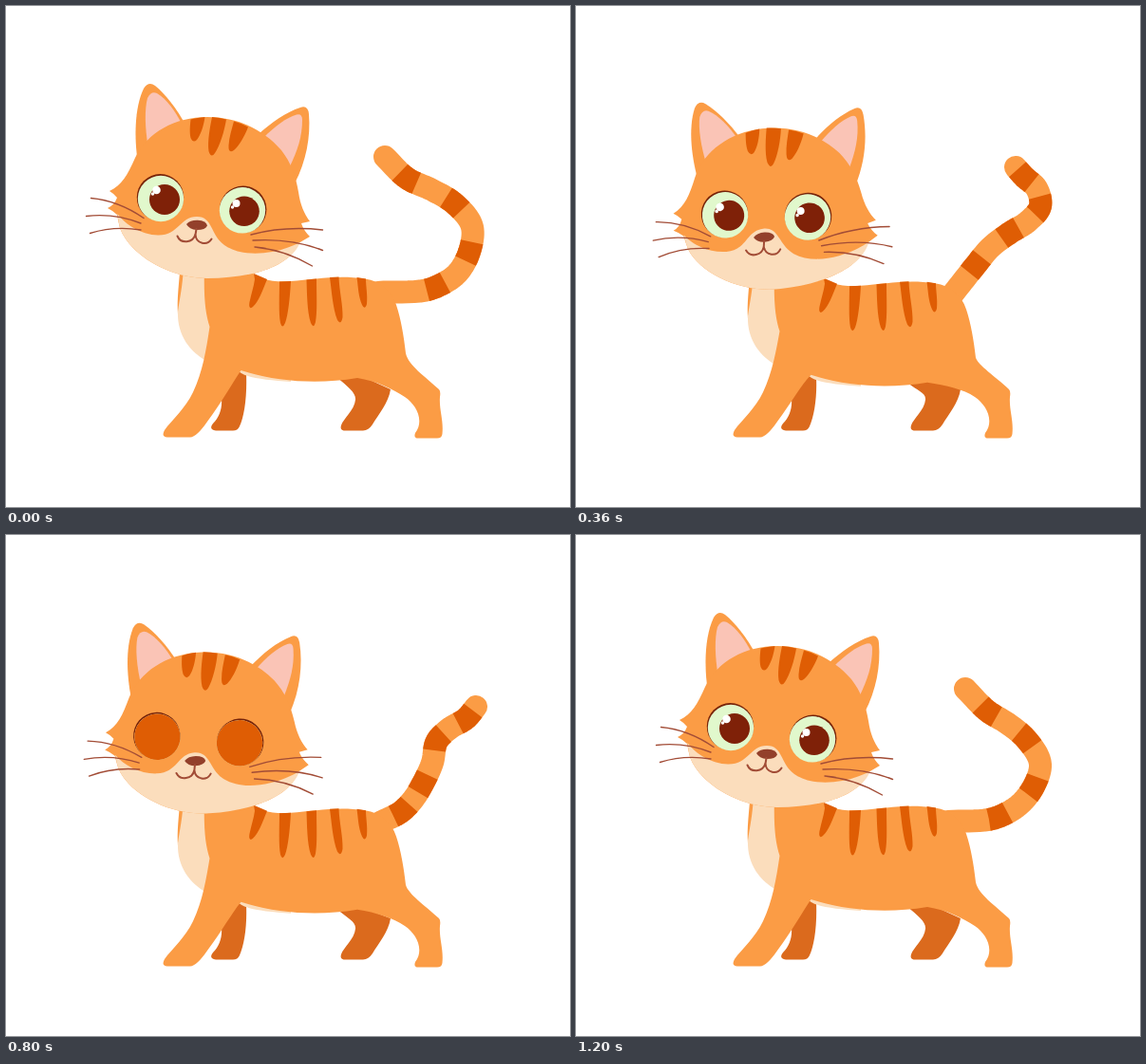
Animation, 594 px wide and 528 px high, one loop 1.24 s. Source, as an HTML page:

```html
<!DOCTYPE html>
<html lang="en">
<head>
<meta charset="utf-8">
<title>Cat</title>
<style>
  html, body { margin: 0; width: 100%; height: 100%; overflow: hidden; background: #fff; }
  svg { display: block; width: 594px; height: 528px; }
  .fur { fill: #fb9c45; }
  .dark { fill: #df5d04; }
  .far { fill: #db6a1d; }
  .cream { fill: #fbddbc; }
  .pink { fill: #fac4b6; }
  .rim { fill: #762309; }
  .white { fill: #e1f8cc; }
  .iris { fill: #7f2108; }
  .shine { fill: #fff; }
  .line { fill: none; stroke: #a24c36; stroke-width: 1.4; stroke-linecap: round; }
  .tail { fill: none; stroke-width: 24; stroke-linejoin: round; }
</style>
</head>
<body>
<svg viewBox="0 0 594 528">
  <defs>
    <clipPath id="eyeL"><circle cx="163" cy="203" r="24.2"/></clipPath>
    <clipPath id="eyeR"><circle cx="249" cy="215.3" r="24.2"/></clipPath>
  </defs>

  <path id="tail" class="tail" stroke="#fb9c45" stroke-linecap="round"/>
  <path id="bands" class="tail" stroke="#df5d04"/>
  <path id="farLegs" class="far"/>
  <path id="belly" class="cream"/>
  <path id="neck" class="fur"/>
  <path id="chest" class="cream"/>
  <path id="body" class="fur"/>
  <g id="backStripes" class="dark">
    <path d="M261 282L275 288C270 300 266 312 260 317C257 320 255 317 257 310C258 304 261 296 262 288Z"/>
    <path d="M288 290.500L300 290C299 308 297 326 294 334Q291 341 289 334C287 324 288 304 288 290.500Z"/>
    <path d="M316.500 288.500L327 287.500C327 305 328 322 326 333Q324 341 321 334C317 322 317 302 316.500 288.500Z"/>
    <path d="M341 286L350.500 285.500C351 300 355 316 354.500 328Q353 337 349 331C344 318 343 300 341 286Z"/>
    <path d="M369.500 286L379 287.500C379 296 381 304 380 314Q378 321 375 315C371 306 371 296 369.500 286Z"/>
  </g>

  <g id="head">
    <g id="earL">
      <path class="fur" d="M139 166C135 140 135 108 145 87Q150 79 157 84C168 93 179 107 189 125L175 160Z"/>
      <path class="pink" d="M150 150C146 128 146 108 149 97Q153 89 159 92C169 98 178 110 186 126L172 155Z"/>
    </g>
    <g id="earR">
      <path class="fur" d="M264 137C280 122 295 112 310 107Q318 104 319 114C321 138 316 164 304 187L278 170Z"/>
      <path class="pink" d="M271 139C284 126 295 118 306 114.500Q312 113 312 120C312 138 307 152 299 169L280 160Z"/>
    </g>
    <path class="fur" d="M212 117C245 117 272 131 290 152C300 165 305 178 308 196C310 210 314 219 320 227L311 229C313 235 316 239 320 243L308 250C299 274 261 287 212 287C172 287 130 262 120 234Q118 226 117 220Q113 216 107 213Q114 210 117 202Q114 198 109 195C122 189 128 178 136 160C149 133 178 117 212 117Z"/>
    <path class="cream" d="M117.500 219C126 231 143 241 160 241.500C182 242 183 222 201 222C218 222 215 241 230 252C250 266 284 262 310 249C299 274 261 287 212 287C172 287 130 262 120 234Q118 226 117.500 219Z"/>
    <g class="dark">
      <path d="M194.500 119.500Q202 117.500 209.500 117C208 127 205 136 201 141Q197 145 194.500 139C193 132 194 125 194.500 119.500Z"/>
      <path d="M217 117Q225 117.500 232 119.500C230 132 225 148 220 155Q216 161 213.500 153C212 142 215 127 217 117Z"/>
      <path d="M240 121.500Q248 123.500 255 127.500C251 138 245 148 240 152Q234 156 234.500 147C235 138 238 129 240 121.500Z"/>
    </g>

    <circle class="rim" cx="162.500" cy="201.800" r="24.700"/>
    <circle class="white" cx="163" cy="203" r="24.200"/>
    <circle class="iris" cx="167" cy="204" r="16"/>
    <circle class="shine" cx="158.500" cy="194" r="4.300"/>
    <circle class="shine" cx="154.500" cy="198" r="1.800"/>
    <circle class="rim" cx="249.700" cy="214.300" r="24.700"/>
    <circle class="white" cx="249" cy="215.300" r="24.200"/>
    <circle class="iris" cx="251" cy="216.300" r="15.800"/>
    <circle class="shine" cx="242.500" cy="208" r="4"/>
    <circle class="shine" cx="238.500" cy="212" r="1.700"/>
    <g clip-path="url(#eyeL)"><rect id="lidL" class="dark" x="137" y="178" width="52" height="0"/></g>
    <g clip-path="url(#eyeR)"><rect id="lidR" class="dark" x="223" y="190.500" width="52" height="0"/></g>

    <path d="M190 230Q194 225.500 202 225.800Q211 226.500 212 231.500Q210 236 201 236Q193 235.500 190 230Z" fill="#93402b"/>
    <path class="line" style="stroke-width:2" d="M200.500 235L199.500 241M180.500 242.500C184 251 197 250 199.500 240.500C200 251 212 253 216.500 245.500"/>
    <g id="whiskL" class="line">
      <path d="M145 223.500Q118 205 89.500 202.500"/>
      <path d="M142 229Q114 218 84.500 221.500"/>
      <path d="M142 236Q114 231.500 88.500 239.500"/>
    </g>
    <g id="whiskR" class="line">
      <path d="M258 241Q294 231.500 333.500 236"/>
      <path d="M260 247Q301 244.500 333.500 257.500"/>
      <path d="M262 254Q294 257 322.500 274"/>
    </g>
  </g>
</svg>
<script>
const LOOP = 1240;
const $ = id => document.getElementById(id);
const set = (id, name, value) => $(id).setAttribute(name, value);

function hermite(a, b, ma, mb, h, u) {
  const v = 1 - u;
  return a * (1 + 2 * u) * v * v + b * u * u * (3 - 2 * u) + h * (ma * u * v * v - mb * u * u * v);
}

// Periodic curve through [time, value] keys that never overshoots.
function track(keys) {
  const n = keys.length;
  const key = i => {
    const k = Math.floor(i / n), [t, v] = keys[i - k * n];
    return [t + k * LOOP, v];
  };
  const slope = i => {
    const [t0, v0] = key(i), [t1, v1] = key(i + 1);
    return (v1 - v0) / (t1 - t0);
  };
  const tangent = i => {
    const a = slope(i - 1), b = slope(i);
    return a * b <= 0 ? 0 : 2 * a * b / (a + b);
  };
  return t => {
    let i = n - 1;
    while (keys[i][0] > t) i--;
    const [t0, v0] = key(i), [t1, v1] = key(i + 1), h = t1 - t0;
    return hermite(v0, v1, tangent(i), tangent(i + 1), h, (t - t0) / h);
  };
}

const tilt = track([[0, 0], [200, 4], [360, 6.7], [510, 8], [640, 7.3], [800, 3.8], [1000, 0.8], [1200, 0]]);
const twitch = track([[0, 0], [200, 1], [360, 0.08], [400, 0], [575, 0.95], [640, 0.6], [800, 0], [1000, 1], [1200, 0]]);
const blink = track([[0, 0], [480, 0], [580, 1], [820, 1], [940, 0]]);

// Tail poses as x, y pairs: root, then band and gap centres in turn, then tip.
const poses = [
  [0, [392, 302, 453, 296, 475, 282, 488, 259, 491, 233, 472, 208, 449, 194, 423, 182, 399, 159]],
  [200, [396, 302, 438, 278, 456, 267, 478, 250, 491, 226, 481, 205, 464, 191, 441, 182, 427, 170]],
  [360, [398, 302, 421, 273, 436, 255, 457, 239, 476, 227, 489, 211, 485, 192, 472, 180, 463, 170]],
  [640, [396, 302, 413, 279, 421, 257, 428, 235, 443, 213, 467, 201, 486, 194, 505, 186, 525, 171]],
  [800, [394, 303, 417, 291, 430, 277, 439, 262, 449, 240, 454, 217, 467, 204, 485, 193, 495, 181]],
  [1000, [392, 302, 417, 299, 435, 292, 451, 282, 467, 262, 473, 239, 468, 218, 460, 199, 451, 175]],
  [1200, [392, 302, 445, 297, 466, 285, 482, 265, 489, 242, 474, 215, 455, 199, 434, 186, 410, 162]]
];
const [, , curl, reach] = poses;
poses.splice(3, 0, [580, reach[1].map((v, i) => v + 0.1 * (v - curl[1][i]))]);
const tailTracks = curl[1].map((_, i) => track(poses.map(([t, p]) => [t, p[i]])));

const STEPS = 10, BAND = 21;

function drawTail(t) {
  const flat = tailTracks.map(f => f(t));
  const pts = [];
  for (let i = 0; i < flat.length; i += 2) pts.push([flat[i], flat[i + 1]]);
  const last = pts.length - 1;
  const gap = i => Math.hypot(pts[i + 1][0] - pts[i][0], pts[i + 1][1] - pts[i][1]);
  const dir = (i, c) => (pts[i + 1][c] - pts[i][c]) / gap(i);
  const tangent = (i, c) => {
    if (i === 0) return dir(0, c);
    if (i === last) return dir(last - 1, c);
    const a = gap(i - 1), b = gap(i);
    return (dir(i - 1, c) * b + dir(i, c) * a) / (a + b);
  };

  const line = [pts[0]], marks = [0];
  let length = 0;
  for (let i = 0; i < last; i++) {
    for (let s = 1; s <= STEPS; s++) {
      const p = [0, 1].map(c =>
        hermite(pts[i][c], pts[i + 1][c], tangent(i, c), tangent(i + 1, c), gap(i), s / STEPS));
      const q = line[line.length - 1];
      length += Math.hypot(p[0] - q[0], p[1] - q[1]);
      line.push(p);
    }
    marks.push(length);
  }
  const d = "M" + line.map(p => p.map(v => v.toFixed(2)).join(" ")).join("L");
  set("tail", "d", d);
  set("bands", "d", d);

  const dash = [0];
  let end = 0;
  for (let k = 1; k < last; k += 2) {
    dash.push(marks[k] - BAND / 2 - end, BAND);
    end = marks[k] + BAND / 2;
  }
  set("bands", "stroke-dasharray", dash.concat(999).join(" "));
}

// Feet stay put while everything above them sinks by drop.
function drawBody(drop) {
  const y = v => (v + drop).toFixed(2);
  set("body", "d", `M209 ${y(275)}L255 ${y(275)}C262 ${y(290)} 285 ${y(291)} 300 ${y(290)}
    C325 ${y(288)} 350 ${y(283)} 378 ${y(287.5)}C395 ${y(290)} 406 ${y(300)} 411 ${y(315)}
    C416 ${y(330)} 419 ${y(348)} 421 ${y(366)}C424 379 441 390 456 404Q458 406 457 412
    C456 426 461 436 459.500 451Q459 455.500 454 455.500L434 455.500Q429 455.500 431 450
    C441 437 432 420 420 412C408 404 390 ${y(395)} 370 ${y(392)}
    C328 ${y(399)} 285 ${y(396)} 247.500 ${y(384)}C238 398 227 418 212 438Q201 454 194 454.500
    L170 454.500Q163 454 167 447C174 437 189 424 197 407
    C207 386 211 362 214.500 ${y(338)}C210 ${y(324)} 208 ${y(308)} 209 ${y(275)}Z`);
  set("neck", "d", `M183.500 ${y(275)}L210 ${y(275)}L210 ${y(330)}L181 ${y(325)}C180 ${y(308)} 182 ${y(295)} 183.500 ${y(275)}Z`);
  set("chest", "d", `M187 ${y(275)}L212 ${y(275)}L216 ${y(338)}L211 ${y(374)}
    C195 ${y(365)} 180 ${y(348)} 181 ${y(322)}C183 ${y(308)} 186 ${y(295)} 187 ${y(275)}Z`);
  set("belly", "d", `M244 ${y(382)}C245 ${y(391)} 270 ${y(394)} 300 ${y(396)}L300 ${y(385)}Z`);
  set("farLegs", "d", `M240 385L253 ${y(387)}C254 412 251 432 246 443Q244 447.500 239 447.500
    L221 447.500Q213 446 218 440C226 432 229 420 226 408Z
    M349 ${y(392)}C360 ${y(401)} 369 408 368 415C367 426 355 435 353 442Q351 448 359 447.500
    L376 447.500Q382 447 386 441C392 431 403 418 405 404L370 ${y(388)}Z`);
  set("backStripes", "transform", `translate(0 ${drop.toFixed(2)})`);
}

const turn = (id, angle, x, y) => set(id, "transform", `rotate(${angle.toFixed(3)} ${x} ${y})`);

function draw(t) {
  const lean = tilt(t), flick = twitch(t), lid = blink(t) * 50;
  drawTail(t);
  drawBody(lean * 0.72);
  turn("head", -lean, 308, 262);
  turn("earL", -10 * flick, 172, 142);
  turn("earR", 16 * flick, 284, 152);
  turn("whiskL", 9.5 * flick, 143, 229);
  turn("whiskR", -7.5 * flick, 260, 247);
  set("lidL", "height", lid);
  set("lidR", "height", lid);
}

// Poses change every 40 ms, with two longer holds.
function step(ms) {
  const t = Math.floor(ms % LOOP / 40) * 40;
  return t === 40 || t === 1040 ? t - 40 : t;
}

const start = performance.now();
function tick() {
  draw(step(performance.now() - start));
  requestAnimationFrame(tick);
}
tick();
</script>
</body>
</html>
```
